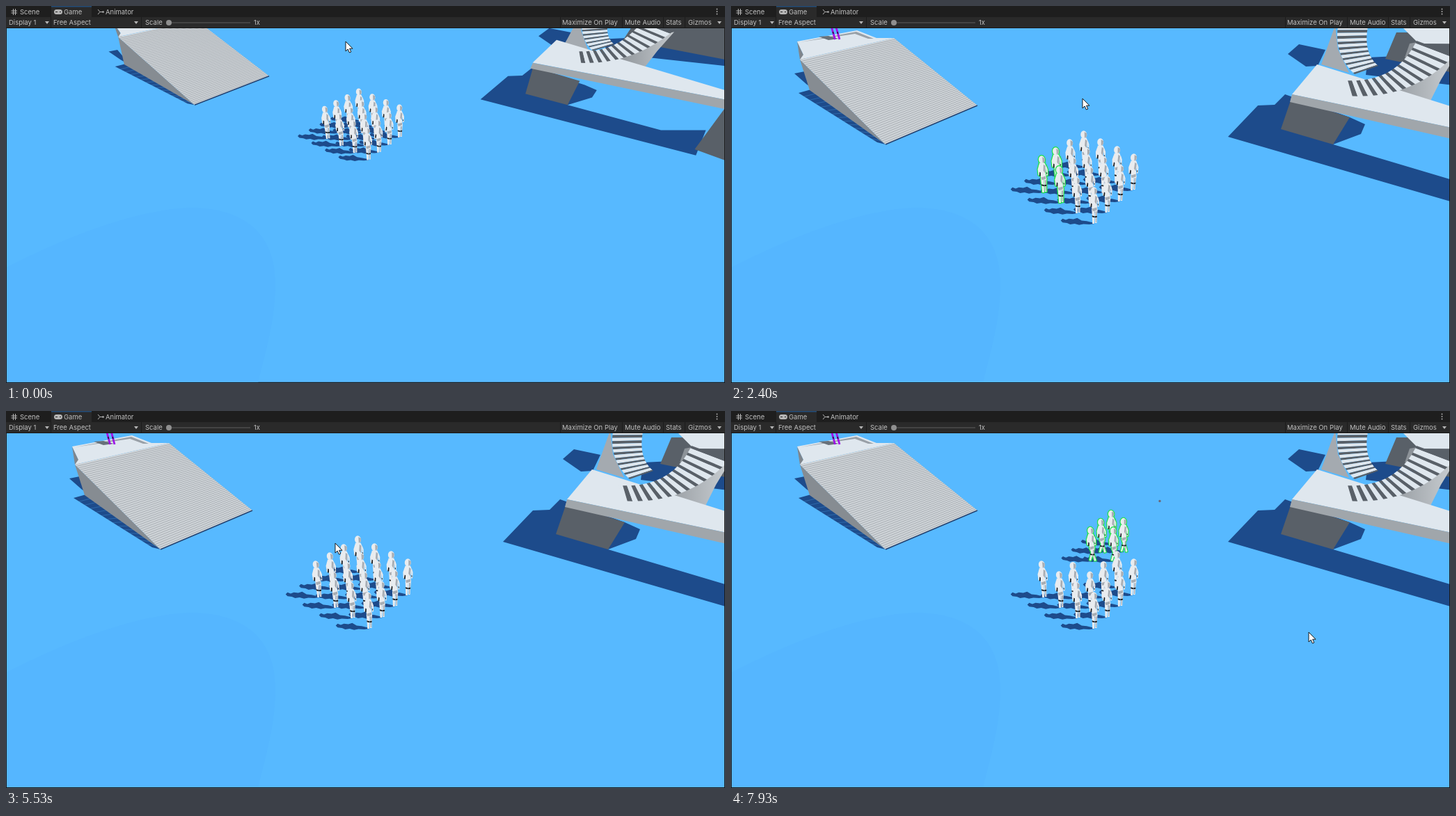
Recreate the animation shown at these times as an HTML page with a canvas. Size 1033 by 542 pixels, loop 8000 ms.

```html
<!DOCTYPE html>
<html lang="en">
<head>
<meta charset="utf-8">
<title>Game view</title>
<style>
html, body { margin: 0; width: 100%; height: 100%; overflow: hidden; background: #1e1e1e; }
canvas { position: absolute; left: 0; top: 0; }
span { position: absolute; white-space: nowrap; color: #c0c0c0; font: 9.5px/14px Inter, "Liberation Sans", sans-serif; }
</style>
</head>
<body>
<canvas id="stage" width="1033" height="542"></canvas>
<script>
const ctx = document.getElementById('stage').getContext('2d');
const LOOP = 8000, STEP = 200 / 3;
const SHADE = '#1d4b8b', LIGHT = '#dfe7ee', DIM = '#596068';
let back = 0; // how far the camera is pulled back, 1 to 0

const lerp = (a, b, u) => a + (b - a) * u;
const between = (a, b, u) => [lerp(a[0], b[0], u), lerp(a[1], b[1], u)];
const bend = (p, u) => between(between(p[0], p[1], u), between(p[1], p[2], u), u);

// Moves a point of the near view to where the pulled-back camera sees it.
// lift is its height above the ground point below it, in pixels.
function view(x, y, lift = 0) {
  const near = back * 0.00046 * (y + lift + 236);
  const s = 1 / (1 + near);
  return [516 + (x - 516) * s, 287 + (y - 287 - 428 * near) * s];
}
function points(list, lift) {
  const out = [];
  for (let i = 0; i < list.length; i += 2) out.push(view(list[i], list[i + 1], lift));
  return out;
}

function shape(fill, pts) {
  ctx.beginPath();
  pts.forEach(p => ctx.lineTo(p[0], p[1]));
  ctx.closePath();
  ctx.fillStyle = fill;
  ctx.fill();
}
const poly = (fill, lift, ...list) => shape(fill, points(list, lift));

function line(color, width, a, b) {
  ctx.beginPath();
  ctx.moveTo(a[0], a[1]);
  ctx.lineTo(b[0], b[1]);
  ctx.strokeStyle = color;
  ctx.lineWidth = width;
  ctx.stroke();
}
function disc(color, x, y, r) {
  ctx.beginPath();
  ctx.arc(x, y, r, 0, 7);
  ctx.fillStyle = color;
  ctx.fill();
}
function rect(color, x, y, w, h) {
  ctx.fillStyle = color;
  ctx.fillRect(x, y, w, h);
}

// keys: [time, x, y]
function track(keys, t) {
  let i = 1;
  while (i < keys.length - 1 && keys[i][0] < t) i++;
  const a = keys[i - 1], b = keys[i];
  return between(a.slice(1), b.slice(1), Math.min(1, (t - a[0]) / (b[0] - a[0])));
}

function label(text, x, y) {
  const s = document.createElement('span');
  s.textContent = text;
  s.style.left = x + 'px';
  s.style.top = y + 'px';
  document.body.append(s);
}

function toolbar() {
  const ink = '#b5b5b5', bar = '#2a2a2a';
  rect('#1e1e1e', 0, 0, 1033, 16);
  rect(bar, 0, 16, 1033, 16);
  rect(bar, 65, 0, 58, 16);
  rect('#234d78', 65, 0, 58, 1.5);
  for (const x of [64, 194, 796, 885, 944, 975]) rect('#1c1c1c', x, 16, 1, 15);
  rect('#181818', 0, 31, 1033, 1);
  for (const d of [10, 13]) {
    rect(ink, d, 4, 1, 9);
    rect(ink, 7.5, d - 3.5, 8.5, 1);
  }
  ctx.beginPath();
  ctx.roundRect(69, 5, 12, 7, 3.5);
  ctx.fillStyle = ink;
  ctx.fill();
  rect(bar, 71, 8, 3, 1);
  rect(bar, 77, 8, 2, 1);
  const fork = [135, 8.5];
  for (const end of [[132, 5], [132, 12], [140, 8.5]]) line(ink, 1, fork, end);
  disc(ink, 139.5, 8.5, 1.3);
  for (const y of [4.5, 8, 11.5]) disc(ink, 1021.5, y, 0.9);
  for (const x of [59, 187, 1025]) shape(ink, [[x - 3, 22], [x + 3, 22], [x, 26]]);
  rect('#5e5e5e', 234, 23.5, 117, 1);
  disc('#8f8f8f', 234, 24, 4);

  label('Scene', 20, 2);
  label('Game', 83, 2);
  label('Animator', 143, 2);
  label('Display 1', 4, 17);
  label('Free Aspect', 68, 17);
  label('Scale', 200, 17);
  label('1x', 356, 17);
  label('Maximize On Play', 799, 17);
  label('Mute Audio', 889, 17);
  label('Stats', 948, 17);
  label('Gizmos', 980, 17);
}

function ground() {
  rect('#57b9ff', 0, 32, 1033, 510);
  ctx.fillStyle = '#55b6ff';
  ctx.fill(new Path2D('M0 376C90 330 190 292 265 290C350 290 386 335 387 395C388 450 372 500 362 542H0z'));
}

function player(t) {
  const sway = Math.sin(t / 420) * 0.5;
  poly('#68717a', 75, 126,44, 140,43, 155,47, 140,49);
  for (const x of [144, 150.5]) {
    const hip = view(x + sway, 28, 95), foot = view(x + 5.5, 48, 75);
    line('#a012e8', 2.8, hip, foot);
    line('#241433', 1.5, between(hip, foot, 0.45), between(hip, foot, 0.6));
  }
}

function ramp(t) {
  poly(SHADE, 0, 91,97, 106,94, 124,124, 108,112);
  const net = points([97,125, 115,120, 222,199, 210,196]);
  shape(SHADE, net);
  for (let k = 1; k < 14; k++)
    line('rgba(87,185,255,.35)', 0.8, between(net[0], net[3], k / 14), between(net[1], net[2], k / 14));
  // platform
  poly('#7f868d', 68, 95,51, 104,70, 108,80, 99,77);
  poly(LIGHT, 70, 95,51, 181,35, 209,46, 234,46, 99,77, 104,70);
  poly('#99a0a7', 70, 99,52, 180,37, 205,47, 197,47, 178,40);
  player(t);
  // side wall and steps
  const [a, b] = points([99,77, 234,46], 68), [d, c, e] = points([222,199, 354,143, 113,121]);
  shape('#868c92', [a, d, e]);
  shape('#cfd4d8', [a, b, c, d]);
  for (let k = 1; k < 50; k++)
    line('#a4aaaf', 0.9, between(a, d, k / 50), between(b, c, k / 50));
  line('#234372', 1.6, d, c);
}

// treads and risers between two curved edges
function stairs(count, lift, inner, outer) {
  const a = points(inner, lift), b = points(outer, lift);
  for (let k = 0; k < count; k++) {
    const u = k / count, v = (k + 1) / count, m = lerp(u, v, 0.5 + 0.2 * u);
    shape(LIGHT, [bend(a, u), bend(a, m), bend(b, m), bend(b, u)]);
    shape(DIM, [bend(a, m), bend(a, v), bend(b, v), bend(b, m)]);
  }
}

function bridge() {
  poly(SHADE, 0, 800,69, 816,55, 854,63, 843,86, 826,87);
  poly(SHADE, 0, 714,188, 757,143, 781,142, 796,127, 889,160, 911,170, 905,184, 865,199, 1036,250, 1115,250, 1109,303);
  // block behind the stairs
  poly(SHADE, 0, 915,74, 956,72, 1180,120, 1180,131, 912,99);
  poly(DIM, 0, 956,38, 1180,38, 1180,125, 940,76);
  poly(LIGHT, 0, 962,28, 1180,28, 1180,55, 988,54);
  poly('#8c9298', 0, 975,54, 986,52, 980,72, 968,74);
  // far and near spiral
  poly('#a4aab0', 20, 868,28, 848,84, 888,96, 872,62);
  stairs(9, 20, [872,30, 866,70, 896,98], [915,30, 908,68, 930,86]);
  const wall = ctx.createLinearGradient(...view(915, 0, 100), ...view(1040, 0, 100));
  wall.addColorStop(0, '#83898f');
  wall.addColorStop(1, '#c9ced2');
  poly(wall, 95, 905,122, 958,143, 985,148, 1004,138, 1020,106, 1042,70, 1000,80);
  // pillars and deck
  poly(DIM, 60, 805,133, 889,160, 889,160);
  shape(DIM, [...points([805,133, 889,160], 60), ...points([865,199, 790,177])]);
  poly(DIM, 0, 1139,202, 1180,190, 1180,320, 1104,290);
  poly(LIGHT, 83, 842,84, 1180,190, 1180,205, 806,127);
  poly('#a0a6ab', 80, 806,127, 1180,205, 1180,224, 803,138);
  stairs(12, 100, [880,107, 955,112, 985,50], [885,129, 978,136, 1040,70]);
}

// figure parts, 54 units high with the feet at the origin
const part = d => new Path2D(d);
const BODY = [
  part('M-4.6-48a4.6 5.8 0 1 0 9.2 0a4.6 5.8 0 1 0-9.2 0z'),
  part('M-4-43L4-43L6-37L4-29L5-20L-3-19L-4-29L-5-37z'),
  part('M-4.5-41L-3-38L-4.5-25L-6.5-25L-7-34z'),
  part('M5.5-40L7.5-34L7-25L5-25z')
];
const LEGS = [part('M-3.5-21L1-21L.5-11L0 0L-2.8 0L-3-10z'), part('M1-21L5-21L4-10L3.6-1L1-1z')];
const DARK = part('M-4.5-30L-3-29L-3.5-24L-5.5-24zM-3.2-12L.6-11L.6-9L-3.2-10zM1-11L4.2-11.5L4-9.5L1-9zM5-29L6.6-29L6-26z');
const GREY = part('M1-52L4.5-50L4-45L1-43zM2-41L4.6-39L3.5-28L1-32zM-3-22L4-24L4-20L-2-18zM2-18L4-18L3-2L2-2z');
const CAST = part('M1 0L-8 1L-17 .5L-24 2L-31 0L-38 1L-43-1L-50-2L-53-5L-50-8L-45-6L-40-8L-33-7L-27-9L-20-5L-12-4L-3-2z');

function cast(f) {
  ctx.save();
  ctx.translate(f.x, f.y);
  ctx.scale(f.s * 0.93, f.s * 0.93);
  ctx.fillStyle = SHADE;
  ctx.fill(CAST);
  ctx.restore();
}

function figure(f) {
  ctx.save();
  ctx.transform(f.s, 0, f.lean / 54, f.s, f.x, f.y);
  const each = paint => {
    BODY.forEach(paint);
    LEGS.forEach((leg, k) => {
      ctx.save();
      ctx.translate(0, -21);
      ctx.rotate((k ? 1 : -1) * f.swing);
      ctx.translate(0, 21);
      paint(leg);
      ctx.restore();
    });
  };
  if (f.green) {
    ctx.strokeStyle = '#1fe04a';
    ctx.lineWidth = 2.6;
    ctx.lineJoin = 'round';
    each(p => ctx.stroke(p));
  }
  ctx.fillStyle = '#e9ecef';
  each(p => ctx.fill(p));
  ctx.fillStyle = '#a8adb3';
  ctx.fill(GREY);
  ctx.fillStyle = '#1b1e22';
  ctx.fill(DARK);
  ctx.restore();
}

function squad(t) {
  const [rear, left, right, front] = points([508,232, 450,268, 577,265, 522,313]);
  const walk = Math.max(0, (t - 7270) / 660);
  const sway = 0.8 * Math.cos(t / 800);
  const list = [];
  for (let j = 0; j < 4; j++) for (let i = 0; i < 4; i++) {
    let [x, y] = between(between(rear, left, i / 3), between(right, front, i / 3), j / 3);
    const lean = (555 - x) * 0.045 + sway;
    const team = j < 2 && i + j < 3; // the five sent off at the end
    const go = team ? walk : 0;
    x += go * (50 - (x - 468) * 0.27);
    y -= go * 40;
    const green = t > 6650 ? team
      : t > 6390 && t < 6610 ? i === 2 && j === 3
      : t > 1790 && t < 3500 && i - j >= 2;
    list.push({ x, y, lean, green, s: lerp(0.98, 0.88, back) - 0.07 * go, swing: go && 0.3 * Math.sin(t / 95) });
  }
  list.sort((a, b) => a.y - b.y);
  list.forEach(cast);
  if (t > 7190) disc('#6b6a7c', 616, 129.5, 1.7);
  list.forEach(figure);
}

const POINTER = [
  [0, 488, 51], [330, 495, 66], [930, 368, 115], [1060, 430, 254], [1130, 433, 265],
  [1800, 482, 328], [2400, 505, 133], [3500, 657, 205], [4470, 483, 232], [6270, 466, 161],
  [6460, 544, 242], [6530, 543, 253], [6930, 570, 190], [7200, 616, 130], [7930, 830, 318]
];
const DRAGS = [[930, 1800], [6270, 6650]];
const ARROW = part('M0 0V14L3.2 11L5.4 16L7.8 15L5.6 10.2H10z');

function pointer(t) {
  for (const [from, to] of DRAGS) if (t > from && t < to) {
    const [x, y] = track(POINTER, from);
    const [px, py] = track(POINTER, Math.max(from, t - STEP));
    rect('rgba(255,255,255,.18)', x, y, px - x, py - y);
  }
  ctx.save();
  ctx.translate(...track(POINTER, t));
  ctx.fillStyle = '#fff';
  ctx.strokeStyle = '#15181c';
  ctx.lineWidth = 1;
  ctx.fill(ARROW);
  ctx.stroke(ARROW);
  ctx.restore();
}

function draw(t) {
  back = Math.max(0, 1 - t / 300) ** 1.4;
  ctx.save();
  ctx.beginPath();
  ctx.rect(1, 32, 1031, 508.5);
  ctx.clip();
  ground();
  ramp(t);
  bridge();
  squad(t);
  pointer(t);
  ctx.restore();
}

rect('#1a1a1a', 0, 0, 1033, 542);
toolbar();
const start = performance.now();
function tick() {
  const t = (performance.now() - start) % LOOP;
  draw(Math.floor((t + 5) / STEP) % 120 * STEP);
  requestAnimationFrame(tick);
}
tick();
</script>
</body>
</html>
```
